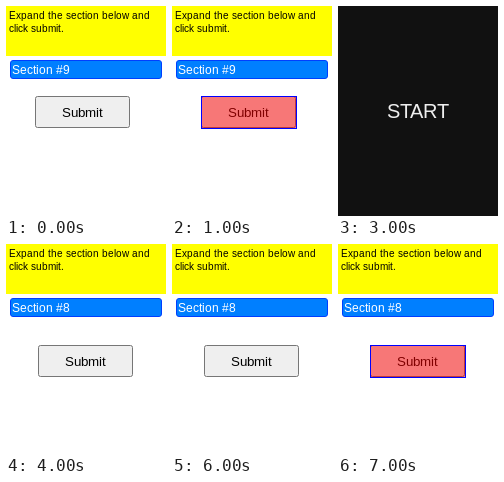
An HTML page that plays this animation: 160 by 210 pixels, repeating every 8000 ms.

```html
<!DOCTYPE html>
<html lang="en">
<head>
<meta charset="utf-8">
<title>Submit task</title>
<style>
  html, body { margin: 0; width: 100%; height: 100%; overflow: hidden; background: #fff; }
  svg { display: block; width: 100%; height: 100%; }
  text { font-family: "Liberation Sans", Arial, sans-serif; }

  .query { font-size: 10px; }
  .section { font-size: 12px; fill: #fff; }
  .label { font-size: 13.333px; }
  .start { font-size: 20px; fill: #eee; }

  .bar { fill: #007fff; stroke: #003eff; }
  .button { fill: #efefef; stroke: #767676; }
  .tint { fill: #f00; fill-opacity: .5; }
  .edge { fill: none; stroke: #00f; }

  /* --at: second at which a layer appears in the 8 s loop */
  .on1, .on2, .on4 {
    visibility: hidden;
    animation: on1 8s step-end calc(var(--at) * 1s - 8s) infinite;
  }
  .on2 { animation-name: on2; }
  .on4 { animation-name: on4; }
  @keyframes on1 { 0% { visibility: visible } 12.5%, 100% { visibility: hidden } }
  @keyframes on2 { 0% { visibility: visible } 25%, 100% { visibility: hidden } }
  @keyframes on4 { 0% { visibility: visible } 50%, 100% { visibility: hidden } }
</style>
</head>
<body>
<svg viewBox="0 0 160 210">
  <rect width="160" height="210" fill="#fff"/>
  <rect width="160" height="50" fill="#ff0"/>
  <text class="query snap" x="3" y="13">Expand the section below and</text>
  <text class="query snap" x="3" y="26">click submit.</text>
  <rect class="bar" x="4.5" y="54.5" width="151" height="18" rx="2.5"/>

  <g class="on4" style="--at: 0">
    <text class="section snap" x="6" y="68">Section #9</text>
    <rect class="button" x="29.5" y="90.5" width="94" height="31" rx="2"/>
    <text class="label snap" x="56" y="111">Submit</text>
  </g>
  <g class="on1" style="--at: 1">
    <rect class="tint" x="29" y="90" width="96" height="33"/>
    <rect class="edge" x="29.5" y="90.5" width="95" height="32"/>
  </g>

  <g class="on4" style="--at: 4">
    <text class="section snap" x="6" y="68">Section #8</text>
    <rect class="button" x="32.5" y="101.5" width="94" height="31" rx="2"/>
    <rect class="on1" style="--at: 5" x="33" y="102" width="93" height="30" fill="#fff"/>
    <text class="label snap" x="59" y="122">Submit</text>
  </g>
  <g class="on1" style="--at: 5">
    <rect class="tint" width="160" height="210"/>
    <path class="edge" d="M.5 210V.5H160"/>
  </g>
  <g class="on1" style="--at: 7">
    <rect class="tint" x="32" y="101" width="96" height="33"/>
    <rect class="edge" x="32.5" y="101.5" width="95" height="32"/>
  </g>

  <g class="on2" style="--at: 2">
    <rect width="160" height="210" fill="#111"/>
    <text class="start snap" x="49" y="112" dx="0 0 -2 -2 -2">START</text>
  </g>
</svg>
<script>
  // Set text on whole-pixel advances.
  const ctx = document.createElement('canvas').getContext('2d');
  for (const el of document.querySelectorAll('.snap')) {
    const style = getComputedStyle(el);
    ctx.font = `${style.fontSize} ${style.fontFamily}`;
    let x = +el.getAttribute('x');
    const stops = [...el.textContent].map(ch => {
      const at = x;
      x += Math.round(ctx.measureText(ch).width);
      return at;
    });
    el.setAttribute('x', stops.join(' '));
  }
</script>
</body>
</html>
```
